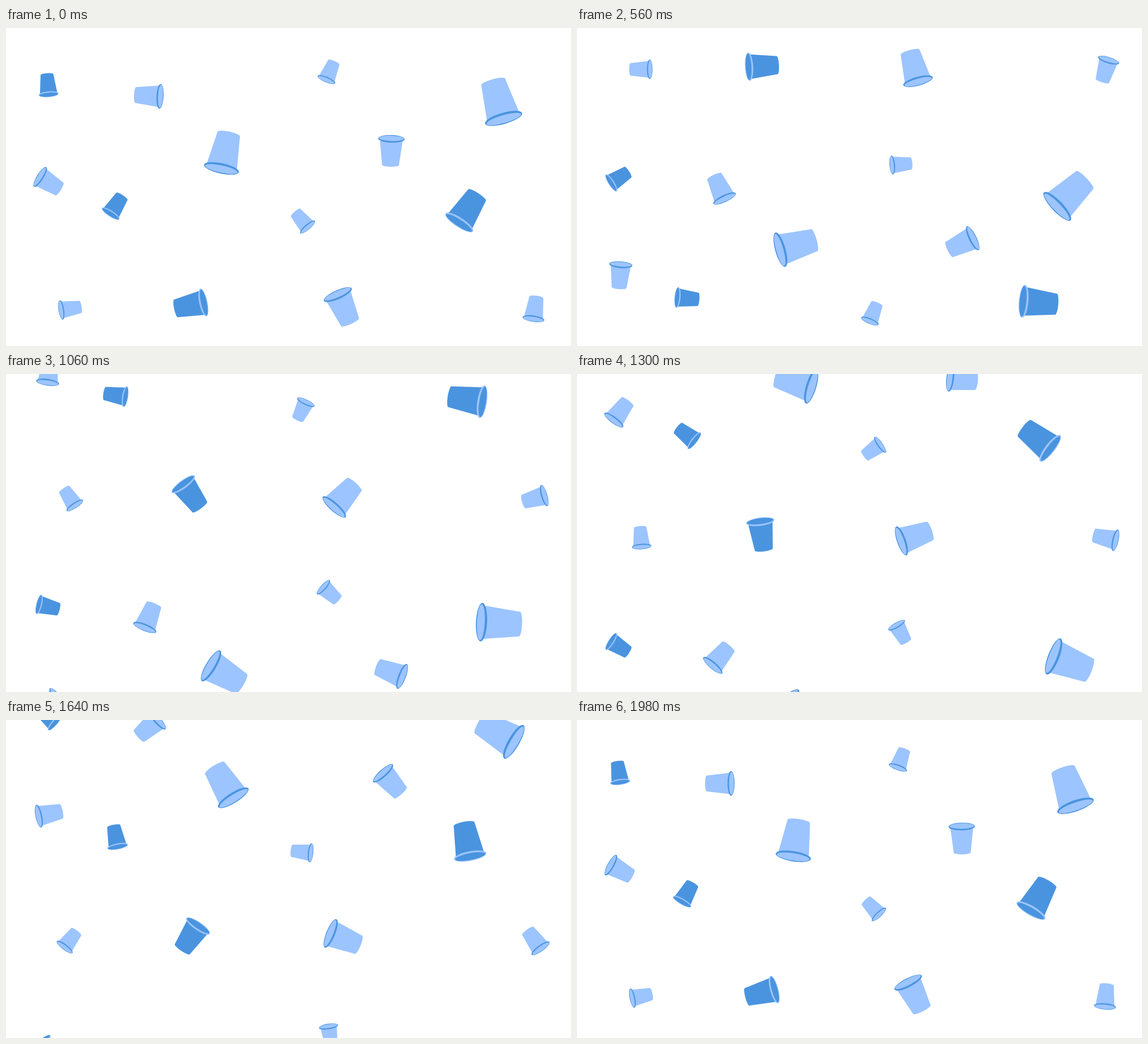
Write an HTML page with a canvas that moves like this. It is 998x561 px and loops after 2 s.

```html
<!DOCTYPE html>
<html lang="en">
<head>
<meta charset="utf-8">
<title>Falling cups</title>
<style>
html, body { margin: 0; width: 100%; height: 100%; overflow: hidden; background: #fff; }
canvas { display: block; }
</style>
</head>
<body>
<canvas id="stage" width="998" height="561"></canvas>
<script>
const ctx = document.getElementById('stage').getContext('2d');
const LIGHT = '#9cc4ff', DARK = '#4a94df';
const LOOP = 2000, STEP = 20;
const HEIGHT = 585.5;   // distance between the two falling layers
const CYCLE = 2006;     // time to fall that distance, in ms
const RAD = Math.PI / 180;

// Start pose of each cup, smallest first: x, y, angle
const poses = [
  [523, 339.5, 140], [572, 77, 203], [113, 495, 261], [74, 101, 175], [194, 313.5, 213],
  [934, 495.5, 188], [76, 272.5, 302], [252.5, 119.5, 93], [680, 216.5, 2], [326.5, 489, 78],
  [596, 492.5, 336], [815, 321, 213], [386.5, 220, 192], [870.5, 130, 164]
];
const darkCups = [3, 4, 9, 11];
const cupSize = i => 16.8 + 0.102 * i * i;

// Degrees turned since the loop start: the spin gently speeds up, then slows down.
const wave = ms => 233 * Math.sin(0.03 * (ms + 520) * RAD);
const turn = ms => wave(ms) - wave(0);

function ellipse(y, rx, ry, color) {
  ctx.fillStyle = color;
  ctx.beginPath();
  ctx.ellipse(0, y, rx, ry, 0, 0, 2 * Math.PI);
  ctx.fill();
}

// A cup with rim radius 1, opening upwards, turning about its middle.
function drawCup(body, rim) {
  ctx.translate(0, -0.9);
  ctx.fillStyle = body;
  ctx.beginPath();
  ctx.moveTo(-0.87, 0.05);
  ctx.lineTo(-0.64, 1.97);
  ctx.ellipse(0, 1.97, 0.64, 0.14, 0, Math.PI, 0, true);
  ctx.lineTo(0.87, 0.05);
  ctx.fill();
  ellipse(0, 1, 0.29, rim);
  ellipse(-0.035, 0.93, 0.205, body);
}

function drawLayer(time) {
  poses.forEach(([x, y, angle], i) => {
    const size = cupSize(i);
    ctx.save();
    ctx.translate(x, y + HEIGHT * time / CYCLE);
    ctx.rotate((angle + turn(time)) * RAD);
    ctx.scale(size, size);
    if (darkCups.includes(i)) drawCup(DARK, LIGHT);
    else drawCup(LIGHT, DARK);
    ctx.restore();
  });
}

const start = performance.now();
function frame() {
  const time = Math.floor((performance.now() - start) % LOOP / STEP) * STEP;
  ctx.clearRect(0, 0, 998, 561);
  drawLayer(time);
  drawLayer(time - CYCLE);
  requestAnimationFrame(frame);
}
frame();
</script>
</body>
</html>
```
